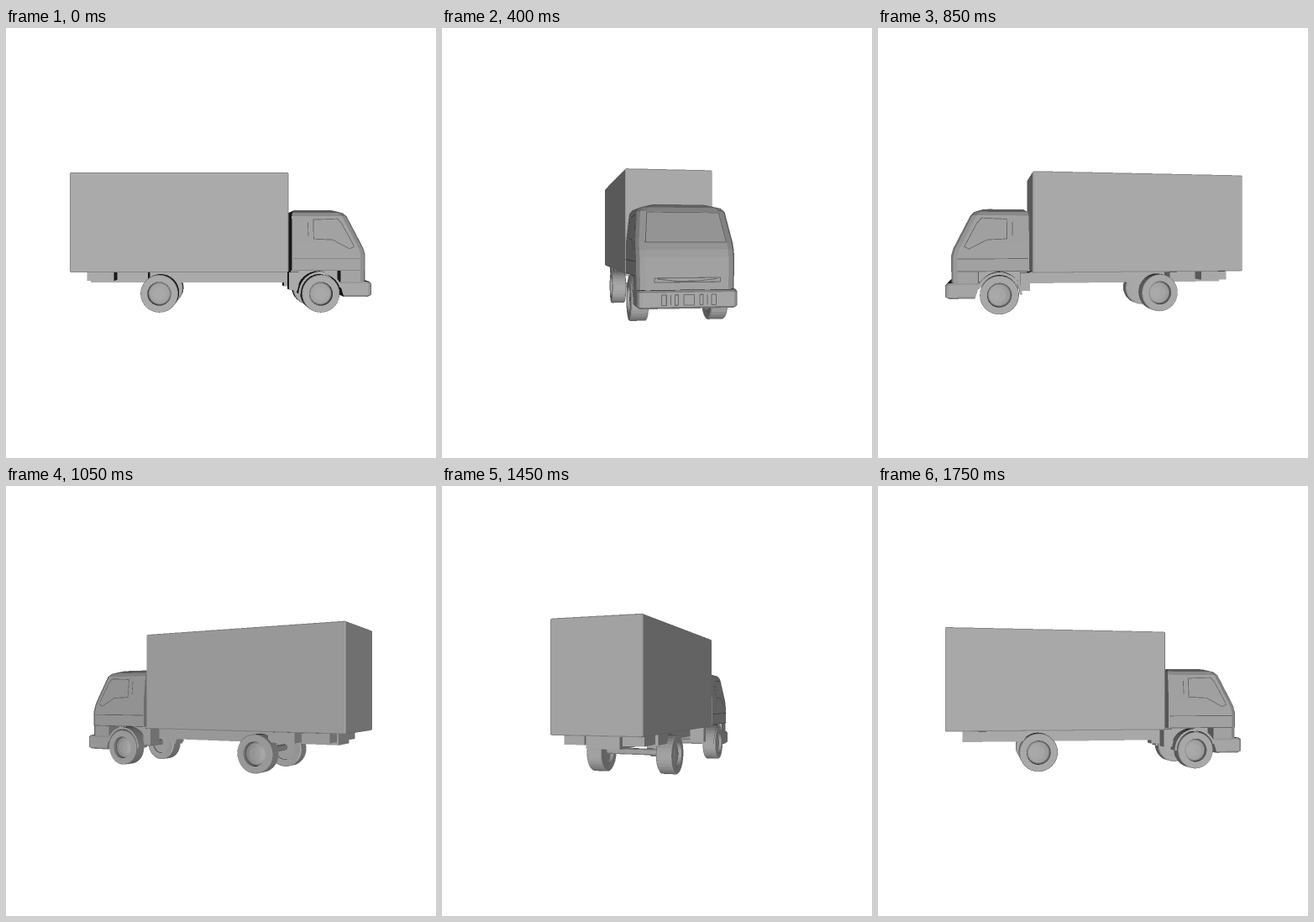
Write an HTML page with a canvas that moves like this. It is 512 px wide and 512 px high and loops after 1800 ms.

```html
<!DOCTYPE html>
<html lang="en">
<head>
<meta charset="utf-8">
<title>Turning truck</title>
<style>
  html, body { margin: 0; width: 100%; height: 100%; overflow: hidden; background: #fff; }
  canvas { display: block; width: 512px; height: 512px; }
</style>
</head>
<body>
<canvas id="stage" width="512" height="512"></canvas>
<script>
const STEP_MS = 50, STEPS = 36;
const DIST = 703;            // camera distance, in stage pixels
const SIZE = 1024, HALF = SIZE / 2, ZOOM = 2;

// Model axes: x to the truck's nose, y up, z to its right-hand side.
const faces = [];
const sub = (a, b) => a.map((v, i) => v - b[i]);
const dot = (a, b) => a[0] * b[0] + a[1] * b[1] + a[2] * b[2];
const cross = (a, b) => [
  a[1] * b[2] - a[2] * b[1], a[2] * b[0] - a[0] * b[2], a[0] * b[1] - a[1] * b[0]];
const unit = a => { const l = Math.hypot(...a) || 1; return a.map(v => v / l); };
const middle = pts => [0, 1, 2].map(i => pts.reduce((t, p) => t + p[i], 0) / pts.length);

// Adds a flat polygon whose normal is turned to agree with `out`.
function face(pts, out, ink = 1) {
  const mid = middle(pts);
  let n = [0, 0, 0];
  pts.forEach((p, i) => {
    const c = cross(sub(p, mid), sub(pts[(i + 1) % pts.length], mid));
    n = n.map((v, k) => v + c[k]);
  });
  n = unit(n);
  if (dot(n, out) < 0) n = n.map(v => -v);
  faces.push({ pts, n, mid, ink });
}

// Convex solid through a stack of rings with equal point counts.
function loft(rings, ink) {
  const core = middle(rings.flat());
  const add = pts => face(pts, sub(middle(pts), core), ink);
  for (let r = 1; r < rings.length; r++) {
    const a = rings[r - 1], b = rings[r];
    a.forEach((p, i) => {
      const j = (i + 1) % a.length;
      add([p, a[j], b[j], b[i]]);
    });
  }
  add(rings[0]);
  add(rings[rings.length - 1]);
}

function slab(x0, x1, y, w, c) {
  return [[x0 + c, w], [x1 - c, w], [x1, w - c], [x1, c - w],
          [x1 - c, -w], [x0 + c, -w], [x0, c - w], [x0, w - c]].map(([x, z]) => [x, y, z]);
}

function block(x0, x1, y0, y1, z0, z1) {
  loft([y0, y1].map(y => [[x0, y, z0], [x1, y, z0], [x1, y, z1], [x0, y, z1]]));
}

// Ring with rounded front corners of size c.
function nose(y, x0, x1, w, c = 7) {
  const side = [[x0, w], [x1 - c, w], [x1 - c * 0.35, w - c * 0.4], [x1, w - c * 1.1]];
  const other = side.map(([x, z]) => [x, -z]).reverse();
  return side.concat(other).map(([x, z]) => [x, y, z]);
}

// Profile of [radius, z, ink] turned about a z-parallel axis.
function lathe(cx, cy, profile, m, from, to, count) {
  for (let k = 1; k < profile.length; k++) {
    const [r0, z0] = profile[k - 1], [r1, z1, ink = 1] = profile[k];
    for (let i = 0; i < count; i++) {
      const a = from + (to - from) * i / count, b = from + (to - from) * (i + 1) / count;
      const at = (r, z, t) => [cx + r * Math.cos(t), cy + r * Math.sin(t), m * z];
      const t = (a + b) / 2, dz = z1 - z0;
      const out = [dz * Math.cos(t), dz * Math.sin(t), m * (r0 - r1)];
      face([at(r0, z0, a), at(r0, z0, b), at(r1, z1, b), at(r1, z1, a)], out, ink);
    }
  }
}

// Thin dark seam lying on a surface with normal n.
function seam(pts, n, closed) {
  n = unit(n);
  const lift = n.map(v => v * 0.4);
  for (let i = closed ? 0 : 1; i < pts.length; i++) {
    const a = pts[(i || pts.length) - 1], b = pts[i];
    const off = unit(cross(sub(b, a), n)).map(v => v * 0.42);
    const put = (p, s) => p.map((v, k) => v + lift[k] + s * off[k]);
    face([put(a, 1), put(b, 1), put(b, -1), put(a, -1)], n, 0.62);
  }
}

function buildBody() {
  loft([slab(-167, 74, -32.7, 46.4, 1), slab(-168, 75, -31.7, 47.4, 1),
        slab(-168, 75, 77.6, 47.4, 1), slab(-167, 74, 78.6, 46.4, 1)]);
  block(-151, 132, -46, -33, -17.5, 17.5);
  block(80, 133, -46, -31, -27, 27);
  for (const m of [-1, 1]) {
    block(-150, -120, -42.5, -33, m * 20, m * 42);
    block(-112, -82, -44, -33, m * 20, m * 42);
    block(77, 88, -53, -33, m * 18, m * 36);
  }
}

function buildCab() {
  loft([nose(-31, 79, 162, 47), nose(-13, 79, 162, 47), nose(-6, 79, 160, 47),
        nose(0, 79, 157, 47), nose(30, 79, 142, 43.5), nose(34, 80, 138, 40.5),
        nose(37.5, 84, 129, 28)], 0.96);
  loft([nose(-43, 133, 162, 46.5), nose(-31, 133, 162, 46.5)], 0.96);
  loft([nose(-60, 137, 165, 45, 4), nose(-58, 136, 168, 47, 4),
        nose(-45, 132, 168, 47, 4), nose(-43, 132, 166, 46, 4)], 0.98);

  // Side seams follow the walls, which lean inwards above y = 0.
  const lean = 3.5 / 30;
  for (const m of [-1, 1]) {
    const draw = (list, closed) => seam(
      list.map(([x, y]) => [x, y, m * (47 - lean * Math.max(0, y))]),
      [0, list[0][1] > 0 ? lean : 0, m], closed);
    draw([[103, 26], [130, 27], [135, 21], [148, -4], [143, -6.5], [124, 3.5], [103, 4.5]], true);
    draw([[97, 23], [97, 8]]);
    draw([[80, -17], [155, -17]]);
    draw([[80, -30.5], [155, -30.5]]);
  }

  const glass = (y, z) => [157 - y / 2, y, z];
  seam([glass(29, 35), glass(29, -35), glass(0.5, -38.5), glass(0.5, 38.5)], [2, 1, 0], true);

  const panel = (x, z0, z1, y0, y1) => seam(
    [[x, y0, z0], [x, y0, z1], [x, y1, z1], [x, y1, z0]], [1, 0, 0], true);
  seam([[162, -36, 31], [162, -32, 31], [162, -32, -31], [162, -36, -31]], [1, 0, 0], true);
  seam([[162, -33, 28], [162, -35, 10], [162, -35, -10], [162, -33, -28]], [1, 0, 0]);
  panel(168, -5, 5, -56.5, -47);
  for (const m of [-1, 1]) {
    panel(168, m * 21, m * 25.5, -56.5, -47);
    panel(168, m * 10, m * 13, -56.5, -47);
    seam([[168, -47, m * 17], [168, -56.5, m * 17]], [1, 0, 0]);
  }
}

function buildWheels() {
  const turn = Math.PI * 2;
  const tyre = [[0, 35], [13, 35], [13, 31.5], [19.7, 31], [21, 32], [21, 47], [20.3, 48],
                [13.2, 48], [13, 44], [12.3, 44, 0.5], [11, 45.2], [7, 46.4], [0, 47]];
  const guard = [[22.3, 31], [24.6, 31], [24.6, 47], [22.3, 47], [22.3, 31]];
  for (const x of [-68.5, 110.8]) {
    for (const m of [-1, 1]) lathe(x, -56.3, tyre, m, 0, turn, 32);
    lathe(x, -54.5, [[3.6, -32], [3.6, 32]], 1, 0, turn, 10);
  }
  for (const m of [-1, 1]) lathe(110.8, -56.3, guard, m, 0.3, Math.PI, 14);
}

buildBody();
buildCab();
buildWheels();

const sheet = document.createElement('canvas');
sheet.width = sheet.height = SIZE;
const pen = sheet.getContext('2d');
const image = pen.createImageData(SIZE, SIZE);
const pixels = new Uint32Array(image.data.buffer);
const near = new Float32Array(SIZE * SIZE);
const view = document.getElementById('stage').getContext('2d');

// Light comes from the viewer; surfaces seen edge-on fall off to black.
function tone(facing) {
  const l = Math.max(0, facing);
  return (84 + 86 * l ** 1.6) * Math.min(1, 0.3 + 5 * l);
}

// Scanline fill; the perspective scale of each pixel serves as its depth.
function fill(pts, n, c, color) {
  const den = c - n[2] * DIST;
  const scr = pts.map(p => {
    const s = DIST / (DIST - p[2]) * ZOOM;
    return [HALF + p[0] * s, HALF - p[1] * s];
  });
  const ys = scr.map(p => p[1]);
  const top = Math.ceil(Math.min(...ys) - 0.5), end = Math.max(...ys) - 0.5;
  for (let row = top; row < end; row++) {
    const y = row + 0.5, cuts = [];
    scr.forEach((a, i) => {
      const b = scr[(i + 1) % scr.length];
      if ((a[1] <= y) !== (b[1] <= y)) cuts.push(a[0] + (y - a[1]) * (b[0] - a[0]) / (b[1] - a[1]));
    });
    cuts.sort((a, b) => a - b);
    const base = n[1] * (HALF - y) / ZOOM - n[2] * DIST;
    for (let k = 0; k + 1 < cuts.length; k += 2) {
      for (let x = Math.ceil(cuts[k] - 0.5); x < cuts[k + 1] - 0.5; x++) {
        const s = (n[0] * (x + 0.5 - HALF) / ZOOM + base) / den;
        const at = row * SIZE + x;
        if (s > near[at]) { near[at] = s; pixels[at] = color; }
      }
    }
  }
}

function render(angle) {
  const co = Math.cos(angle), si = Math.sin(angle);
  const spin = p => [p[0] * co - p[2] * si, p[1], p[0] * si + p[2] * co];
  pixels.fill(0xffffffff);
  near.fill(0);
  for (const f of faces) {
    const n = spin(f.n), c = dot(f.n, f.mid);
    if (n[2] * DIST - c <= 0.01) continue;
    const g = Math.round(tone(n[2]) * f.ink);
    fill(f.pts.map(spin), n, c, (0xff000000 | g << 16 | g << 8 | g) >>> 0);
  }
  pen.putImageData(image, 0, 0);
  view.drawImage(sheet, 0, 0, 512, 512);
}

let shown = -1;
const start = performance.now();
function tick() {
  const step = Math.floor((performance.now() - start) / STEP_MS) % STEPS;
  if (step !== shown) {
    shown = step;
    render(step / STEPS * Math.PI * 2);
  }
  requestAnimationFrame(tick);
}
tick();
</script>
</body>
</html>
```
